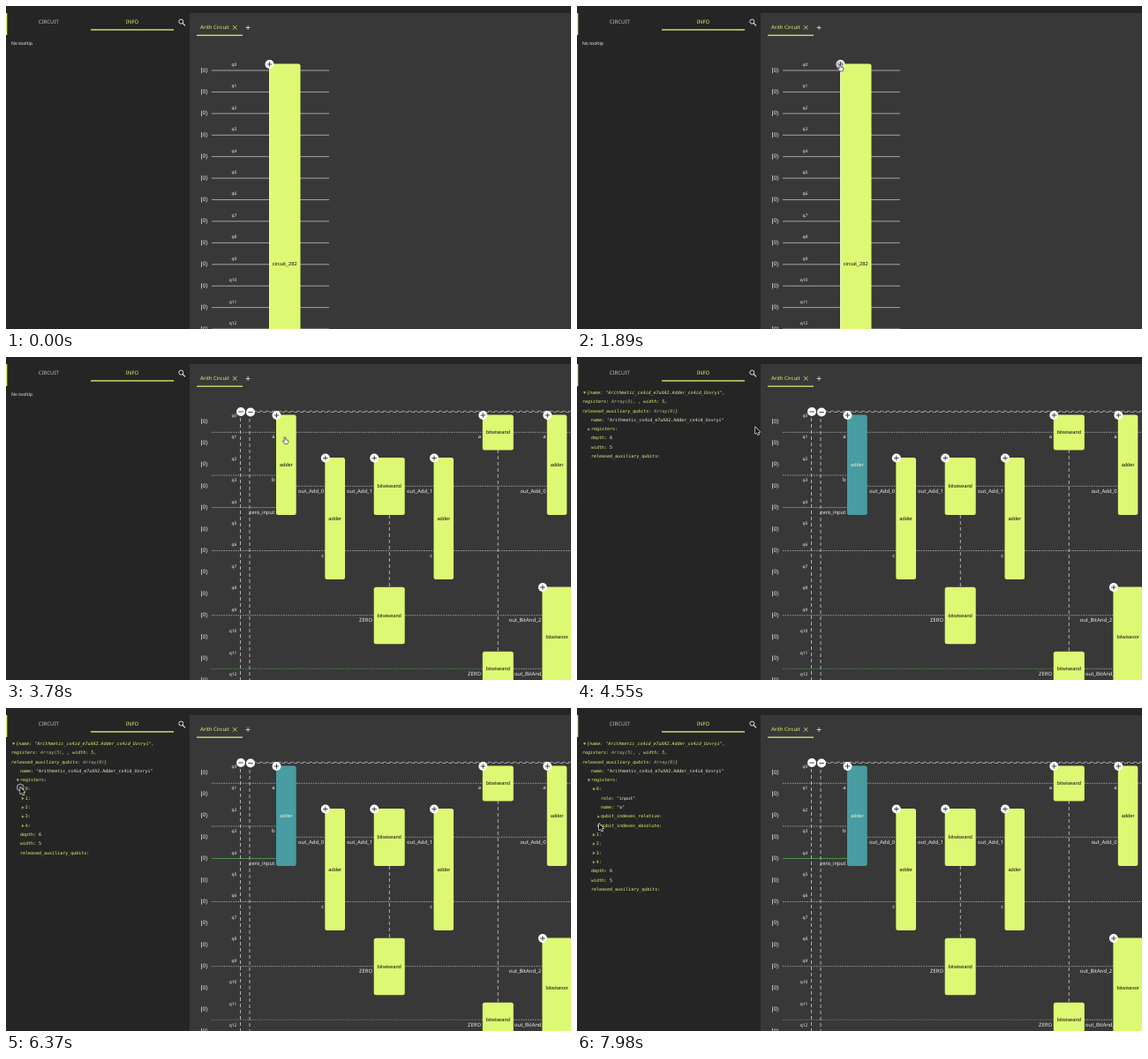
An HTML page with a canvas that plays this animation: 640x366 px, repeating every 8000 ms.

```html
<!DOCTYPE html>
<html lang="en">
<head>
<meta charset="utf-8">
<title>Circuit viewer</title>
<style>
  html, body { margin: 0; width: 100%; height: 100%; overflow: hidden; background: #383838; }
  canvas { display: block; }
</style>
</head>
<body>
<canvas></canvas>
<script>
const canvas = document.querySelector('canvas');
const c = canvas.getContext('2d');
const ratio = window.devicePixelRatio || 1;
canvas.width = 640 * ratio;
canvas.height = 366 * ratio;
canvas.style.width = '640px';
canvas.style.height = '366px';
c.textRendering = 'geometricPrecision';

const LOOP = 8000, STEP = 70;
const LIME = '#ddf873', WHITE = '#f0f0f0', WIRE = '#b0b0b0', GREEN = '#4f8d4a', TEAL = '#489ca2';
const UI = '"Noto Sans", "Open Sans", sans-serif';
const LABEL = '"Liberation Sans", Arial, sans-serif';
const MONO = '"DejaVu Sans Mono", monospace';

// Times of state changes
const OPEN_CIRCUIT = 2030, OPEN_PARTS = 3150, SELECT = 4200, OPEN_REGISTERS = 5670, OPEN_FIRST = 6580;
const CLICKS = [1870, 2990, 4060, 5390, 6350];
const SHOW_CURSOR = 980;
// time, x, y of the pointer tip
const PATH = [
  [980, 284, 98], [1400, 297, 68], [1610, 297, 68], [1820, 298, 66.5],
  [2380, 298, 66.5], [2700, 304, 68], [3360, 304, 68], [3780, 316, 91],
  [4270, 316, 91], [4830, 88, 68], [5110, 42, 88], [5390, 15, 82],
  [5740, 15, 82], [6020, 20, 132], [6230, 16, 90], [6930, 18, 90],
  [7140, 27, 109], [7400, 31, 127], [7700, 26, 128], [7770, 26, 128], [7980, 25, 131]
];

function text(s, x, y, size, color, font = UI, align = 'left', style = '') {
  c.font = `${style} ${size}px ${font}`;
  c.textAlign = align;
  c.textBaseline = 'middle';
  c.fillStyle = color;
  c.fillText(s, x, y);
}

function line(x1, y1, x2, y2, color, dash = [], width = 1) {
  c.strokeStyle = color;
  c.lineWidth = width;
  c.setLineDash(dash);
  c.beginPath();
  c.moveTo(x1, y1);
  c.lineTo(x2, y2);
  c.stroke();
  c.setLineDash([]);
}

function rect(x, y, w, h, color) {
  c.fillStyle = color;
  c.fillRect(x, y, w, h);
}

function circle(x, y, r) {
  c.beginPath();
  c.arc(x, y, r, 0, 7);
}

function shape(points, color) {
  c.fillStyle = color;
  c.beginPath();
  points.forEach(([x, y]) => c.lineTo(x, y));
  c.closePath();
  c.fill();
}

function button(x, y, plus = true) {
  c.fillStyle = '#fff';
  circle(x, y, 5);
  c.fill();
  line(x - 2.7, y, x + 2.7, y, '#333', [], 0.9);
  if (plus) line(x, y - 2.7, x, y + 2.7, '#333', [], 0.9);
}

function block(name, x1, y1, x2, y2, labelY, plus = true, selected = false) {
  c.fillStyle = selected ? TEAL : LIME;
  c.beginPath();
  c.roundRect(x1, y1, x2 - x1, y2 - y1, 2.5);
  c.fill();
  text(name, (x1 + x2) / 2, labelY, 5.75, selected ? '#e4f2d2' : '#111', LABEL, 'center');
  if (plus) button(x1 + 0.5, y1 + 0.5);
}

// Block that runs off the stage, with a light left edge
function tallBlock(name, x1, x2, labelY) {
  block(name, x1, 65.5, x2, 380, labelY);
  rect(x1, 72, 1, 294, '#eefbb8');
}

function frame() {
  rect(0, 0, 640, 366, '#252525');
  rect(208, 8, 432, 358, '#383838');
  rect(0, 8, 1.3, 25, LIME);
  text('CIRCUIT', 48.3, 18.5, 6, '#c4c4c4', UI, 'center');
  text('INFO', 143, 18.5, 6, LIME, UI, 'center');
  rect(96, 26.3, 94, 1.3, LIME);
  c.strokeStyle = WHITE;
  c.lineWidth = 0.9;
  circle(198.3, 17.6, 2.5);
  c.stroke();
  line(200, 19.4, 203, 22.4, WHITE, [], 1.1);
  text('Arith Circuit', 220, 24.5, 5.9, LIME);
  rect(216, 32.6, 52, 1.2, LIME);
  line(257, 22.1, 261.5, 26.6, LIME, [], 0.8);
  line(261.5, 22.1, 257, 26.6, LIME, [], 0.8);
  line(271.6, 24.5, 276.6, 24.5, WHITE, [], 0.75);
  line(274.1, 22, 274.1, 27, WHITE, [], 0.75);
}

function ket(x, y) {
  line(x, y - 3, x, y + 3.4, WHITE, [], 0.7);
  text('0', x + 3, y, 6.2, WHITE, UI, 'center');
  line(x + 5.3, y - 2.8, x + 6.6, y + 0.2, WHITE, [], 0.6);
  line(x + 6.6, y + 0.2, x + 5.3, y + 3.2, WHITE, [], 0.6);
}

function qubits(lineEnd) {
  for (let i = 0; i < 13; i++) {
    const y = 73 + 24.42 * i;
    ket(221.5, y - 0.2);
    text('q' + i, 261.3, y - 6.5, 4.9, WHITE, UI, 'right');
    if (lineEnd) line(233, y, lineEnd, y, WIRE, [], 0.9);
  }
}

function closedCircuit() {
  qubits(366);
  tallBlock('circuit_282', 298, 333.5, 292.5);
}

function openCircuit() {
  qubits(467);
  c.strokeStyle = WIRE;
  c.lineWidth = 0.9;
  c.setLineDash([4, 3]);
  c.strokeRect(265.5, 61.5, 169, 320);
  c.setLineDash([]);
  button(266, 62, false);
  tallBlock('Arithmetic_0', 302, 341.5, 280);
  tallBlock('Arithmetic_1', 374.5, 414, 292.5);
}

function parts(selected) {
  qubits();
  const dots = [1.5, 1.2], dashes = [4, 3];
  const wire = (y, ...ends) => {
    for (let i = 0; i < ends.length; i += 2) line(ends[i], y, ends[i + 1], y, '#a8a8a8', dots, 0.9);
  };
  wire(85.3, 233, 306, 329, 540, 575, 613, 635, 640);
  wire(134, 233, 306);
  wire(146.3, 329, 361, 384, 417, 452, 485, 507, 613);
  wire(219.5, 233, 361, 384, 485, 507, 640);
  wire(292.7, 233, 417, 452, 607);
  wire(353.3, 575, 607);
  line(233, 170.5, 306, 170.5, GREEN);
  line(233, 353.3, 540, 353.3, GREEN, dots);
  line(265.5, 62, 265.5, 366, WIRE, dashes);
  line(276, 63, 276, 366, WIRE, dashes);
  line(266, 61.3, 640, 61.3, WIRE, dashes, 0.8);
  line(277, 62.5, 640, 62.5, WIRE, dashes, 0.8);
  line(434.3, 179, 434.3, 261, WIRE, dashes);
  line(557.3, 105, 557.3, 334, WIRE, dashes);
  button(266, 62, false);
  button(277, 62.5, false);

  const port = (s, x, y) => text(s, x, y, 5.9, WHITE, UI, 'right');
  for (const x of [304.5, 538, 611.5]) port('a', x, 90.8);
  port('b', 304.5, 139.8);
  port('zero_input', 304.5, 176);
  port('out_Add_0', 360, 152);
  port('out_Add_1', 415, 152);
  port('out_Add_1', 483, 152);
  port('out_Add_0', 611.5, 152);
  port('c', 360, 225);
  port('c', 483, 225);
  port('ZERO', 415, 298);
  port('out_BitAnd_2', 606, 298);
  port('ZERO', 538, 359);
  text('out_BitAnd_1', 576, 359, 5.9, WHITE);

  block('adder', 306, 65.5, 328.7, 179, 122, true, selected);
  block('adder', 361.3, 114, 384, 252, 183);
  block('bitwiseand', 416.7, 114, 451.7, 179, 146.3);
  block('adder', 484.5, 114, 507, 252, 183);
  block('bitwiseand', 416.7, 260.7, 451.7, 325.3, 293, false);
  block('bitwiseand', 539.8, 65.5, 574.8, 105.5, 85.3);
  block('bitwiseand', 539.8, 333.7, 574.8, 390, 353.3, false);
  block('adder', 612.8, 65.5, 635.3, 179, 122);
  block('bitwisexor', 607.4, 260.5, 641, 390, 317);
}

function tree(t) {
  const id = '"Arithmetic_cs4id_e7uXA2.Adder_cs4id_Uzvryi"';
  const pale = '#e8efcc', dim = '#b9c08f';
  let y = 40.6;
  // Pairs of text and colour; open: true, false or undefined for no arrow
  const row = (x, open, runs, style = '') => {
    if (open !== undefined) {
      const a = x - 4.2;
      shape(open ? [[a, y - 1.4], [a + 3.2, y - 1.4], [a + 1.6, y + 1.5]]
                 : [[a + 0.4, y - 1.7], [a + 3.2, y], [a + 0.4, y + 1.7]], open ? '#aebf65' : '#9aa667');
    }
    for (const [s, color] of runs) {
      text(s, x, y, 5, color, MONO, 'left', style);
      x += c.measureText(s).width;
    }
    y += 10.32;
  };
  const pair = (x, key, value = '', open) => row(x, open, [[key + ':', LIME], [' ' + value, pale]]);

  row(11.2, true, [['{name: ', LIME], [id + ',', LIME]], 'italic');
  row(6, undefined, [['registers: ', LIME], ['Array(5)', dim], [', , width: 5,', LIME]], 'italic');
  row(6, undefined, [['released_auxiliary_qubits: ', LIME], ['Array(0)', dim], ['}', LIME]], 'italic');
  pair(16, 'name', id);
  const open = t >= OPEN_REGISTERS, first = t >= OPEN_FIRST;
  pair(16, 'registers', '', open);
  if (open) {
    for (let i = 0; i < 5; i++) {
      pair(21.7, i, '', first && !i);
      if (first && !i) {
        pair(27, 'role', '"input"');
        pair(27, 'name', '"a"');
        pair(27, 'qubit_indexes_relative', '', false);
        pair(27, 'qubit_indexes_absolute', '', false);
      }
    }
  }
  pair(16, 'depth', '6');
  pair(16, 'width', '5');
  pair(16, 'released_auxiliary_qubits');
}

function pointerAt(t) {
  const i = PATH.findIndex(p => p[0] > t);
  if (i < 0) return PATH[PATH.length - 1].slice(1);
  const [t0, x0, y0] = PATH[i - 1], [t1, x1, y1] = PATH[i];
  const u = (t - t0) / (t1 - t0), k = u * u * (3 - 2 * u);
  return [x0 + (x1 - x0) * k, y0 + (y1 - y0) * k];
}

function pointer(t) {
  if (t < SHOW_CURSOR) return;
  const [x, y] = pointerAt(t);
  const click = CLICKS.find(s => t >= s && t < s + 280);
  if (click !== undefined) {
    const r = Math.min(9.5, 3 + (t - click) * 0.05);
    c.lineWidth = 0.9;
    c.strokeStyle = 'rgba(190,190,190,.85)';
    circle(x, y, r);
    c.stroke();
    c.strokeStyle = 'rgba(120,120,120,.8)';
    circle(x, y, r * 0.75);
    c.stroke();
  }
  const hand = t >= 1400 && t < 4400;
  const outline = hand
    ? [[-1, 0], [0.6, 0], [0.9, 2.7], [3.7, 3.4], [3.9, 5.4], [2.9, 7.5], [-0.4, 7.5], [-2.7, 4.4], [-2, 3.7], [-0.8, 4.6]]
    : [[0, 0], [0, 7.4], [1.8, 5.9], [3, 8.6], [4.2, 8], [3, 5.5], [5.2, 5.3]];
  c.strokeStyle = hand ? '#444' : '#fff';
  c.lineWidth = hand ? 0.8 : 1.2;
  c.lineJoin = 'round';
  shape(outline.map(([a, b]) => [x + a, y + b]), hand ? '#f4f4f4' : '#111');
  c.stroke();
  if (!hand) c.fill();
}

function draw(now) {
  const t = Math.floor((now % LOOP) / STEP) * STEP;
  c.setTransform(ratio, 0, 0, ratio, 0, 0);
  frame();
  if (t < OPEN_CIRCUIT) closedCircuit();
  else if (t < OPEN_PARTS) openCircuit();
  else parts(t >= SELECT);
  if (t < SELECT) text('No tooltip', 6, 42.3, 5.1, WHITE);
  else tree(t);
  pointer(t);
  requestAnimationFrame(() => draw(performance.now() - start));
}

const start = performance.now();
draw(0);
</script>
</body>
</html>
```
